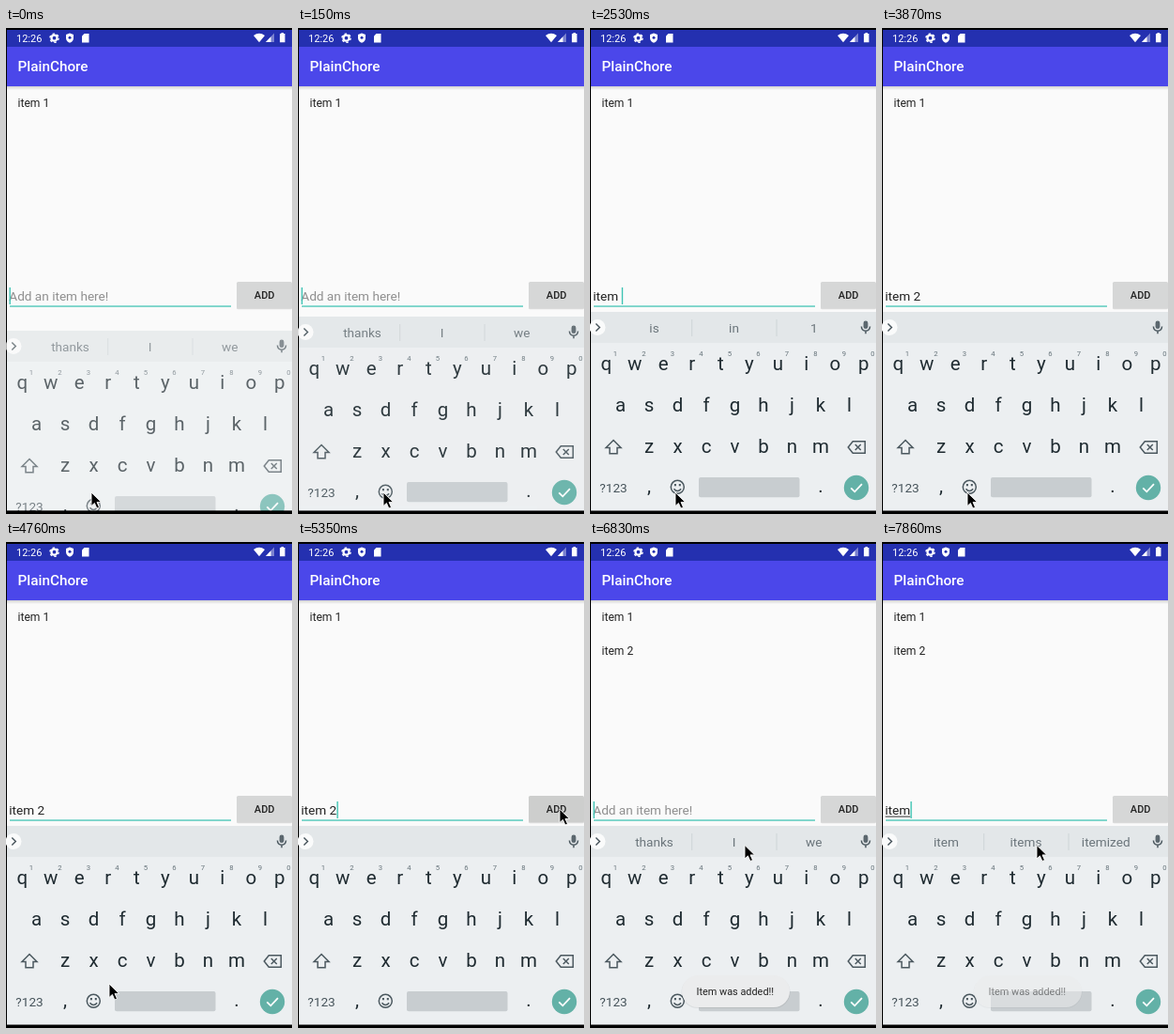
Recreate the animation shown at these times as an HTML page. Size 305 px wide and 517 px high, loop 8000 ms.

```html
<!DOCTYPE html>
<html lang="en">
<head>
<meta charset="utf-8">
<title>To-do list</title>
<style>
html, body { margin: 0; width: 100%; height: 100%; overflow: hidden; background: #000; }
svg { display: block; width: 305px; height: 517px; font-family: Roboto, sans-serif; }
text { white-space: pre; }
.mid { text-anchor: middle; }
.line { fill: none; stroke: #4b585f; stroke-width: 1.5; }
</style>
</head>
<body>
<svg viewBox="0 0 305 517">
  <defs>
    <linearGradient id="shade" x2="0" y2="1">
      <stop offset="0" stop-color="#000" stop-opacity=".16"/>
      <stop offset="1" stop-color="#000" stop-opacity="0"/>
    </linearGradient>
  </defs>
  <rect width="305" height="517"/>
  <rect x="1" y="20" width="304" height="493" fill="#fafafa"/>

  <!-- status bar -->
  <rect x="1" y="2" width="304" height="18" fill="#2430b0"/>
  <g fill="#fff">
    <text x="11" y="14.7" font-size="11">12:26</text>
    <circle cx="51.5" cy="10.7" r="3" fill="none" stroke="#fff" stroke-width="2.2"/>
    <circle cx="51.5" cy="10.7" r="4.6" fill="none" stroke="#fff" stroke-width="1.4" stroke-dasharray="2.4 2.4"/>
    <path d="M68 5.5l4 1.6v3.3q0 3.8-4 5.4q-4-1.6-4-5.4v-3.3z"/>
    <circle cx="68" cy="10.3" r="1.5" fill="#2430b0"/>
    <path d="M83.5 6h5v9.5h-7.5v-7z"/>
    <path d="M264 8q6-4.7 12 0l-6 7.2z"/>
    <path d="M286 5.5v9.5h-9z" opacity=".4"/>
    <path d="M282.5 9.2v5.8h-5.5z"/>
    <path d="M293.5 5h2.5v1h1.5v9.3h-5.5v-9.3h1.5z"/>
  </g>

  <!-- app bar and list -->
  <rect x="1" y="20" width="304" height="42" fill="#4b47ea"/>
  <rect x="1" y="62" width="304" height="4" fill="url(#shade)"/>
  <text x="12.5" y="46.3" font-size="15.3" font-weight="500" fill="#fff">PlainChore</text>
  <g font-size="12.1" fill="#222">
    <text x="12.5" y="84">item 1</text>
    <text id="added" x="12.5" y="120">item 2</text>
  </g>

  <!-- input row -->
  <rect x="4" y="295.2" width="236" height="1.7" fill="#6fd2c6"/>
  <text id="hint" x="3.3" y="290" font-size="13.6" fill="#8f8f8f">Add an item here!</text>
  <text id="typed" x="3.3" y="290" font-size="13.6" fill="#222"></text>
  <rect id="composing" x="3.5" y="291.6" height="1" fill="#333"/>
  <rect id="caret" y="276" width="1.4" height="18" fill="#3fc4b4"/>
  <rect x="246" y="271" width="59" height="28.3" rx="1.5" fill="#000" opacity=".13"/>
  <rect id="button" x="246" y="270" width="59" height="28" rx="1.5"/>
  <text class="mid" x="275.7" y="288.2" font-size="11" font-weight="500" fill="#222">ADD</text>

  <g id="keyboard">
    <rect x="1" y="302" width="304" height="215" fill="#eceff1"/>
    <rect x="1" y="302" width="304" height="33" fill="#e3e7e9"/>
    <circle cx="8" cy="318.5" r="8.5" fill="#fafbfb"/>
    <path class="line" d="M6.3 314.5l4 4l-4 4"/>
    <g id="words" class="mid" font-size="13.6" fill="#6b757b">
      <path d="M108.7 310v18M199 310v18" stroke="#ced4d7"/>
      <text x="68.5" y="324"></text>
      <text x="153.5" y="324"></text>
      <text x="238.7" y="324"></text>
    </g>
    <rect x="291.6" y="311.5" width="4.8" height="8.6" rx="2.4" fill="#5b676e"/>
    <path class="line" stroke-width="1.2" d="M289.4 317.5q.4 4.7 4.6 4.7t4.6-4.7M294 322v3.2"/>
    <g id="keys" class="mid" fill="#1f2b31"></g>
    <path class="line" d="M25 438.5l8 8h-4v6.3h-8v-6.3h-4z"/>
    <path class="line" d="M275.3 446l5-6.3h13v12.6h-13zM282.8 443l6 6m0-6l-6 6"/>
    <text class="mid" x="25" y="493.5" font-size="13.6" fill="#46535a">?123</text>
    <circle class="line" cx="93.3" cy="488.3" r="7"/>
    <path class="line" d="M89.5 490.3q3.8 4.6 7.6 0"/>
    <path d="M89.9 485h2v2.2h-2zM94.8 485h2v2.2h-2z" fill="#4b585f"/>
    <rect x="116" y="478" width="107.5" height="21.3" rx="2" fill="#c8cdd0"/>
    <circle cx="284" cy="489" r="13.2" fill="#63b1a7"/>
    <path d="M278.3 489.3l4 4l7.7-8.2" fill="none" stroke="#fff" stroke-width="1.8"/>
  </g>

  <g id="toast">
    <rect x="97.5" y="462" width="116" height="34" rx="17" fill="#000" opacity=".07"/>
    <rect x="98" y="461" width="115" height="34" rx="17" fill="#ebeced"/>
    <text class="mid" x="154.8" y="481.7" font-size="10.9" fill="#222">Item was added!!</text>
  </g>
  <rect y="513.5" width="305" height="3.5"/>
  <path id="mouse" d="M0 0v14.5l3.4-3.1l2.5 5.6l2.6-1.1l-2.5-5.5h4.6z" stroke="#fff" stroke-width=".9"/>
</svg>

<script>
const LOOP = 8000;
const $ = id => document.getElementById(id);
const svgNode = (tag, attrs, text) => {
  const node = document.createElementNS('http://www.w3.org/2000/svg', tag);
  for (const name in attrs) node.setAttribute(name, attrs[name]);
  node.textContent = text;
  return node;
};

const KEY_STEP = 30.5;
const addRow = (letters, x, y) => [...letters].forEach((letter, i) =>
  $('keys').append(svgNode('text', { x: x + i * KEY_STEP, y, 'font-size': 20.5 }, letter)));
addRow('qwertyuiop', 17.3, 363.5);
addRow('asdfghjkl', 32.5, 407.5);
addRow('zxcvbnm', 63, 451.5);
addRow(',', 63, 494);
addRow('.', 246, 494);
[...'1234567890'].forEach((digit, i) => $('keys').append(
  svgNode('text', { x: 27 + i * KEY_STEP, y: 348.7, 'font-size': 7.7, fill: '#66737a' }, digit)));

// Each track lists [start time, value]; a value holds until the next start.
const typed = [[0, ''], [1340, 'i'], [1490, 'ite'], [1780, 'item'], [2530, 'item '], [3270, 'item 2'],
  [5790, ''], [7420, 'i'], [7570, 'it'], [7710, 'ite'], [7860, 'item']];
const caretOn = [[0, 1], [740, 0], [1340, 1], [2230, 0], [2530, 1], [2980, 0], [3270, 1], [3870, 0],
  [4320, 1], [4760, 0], [5200, 1], [7120, 0], [7420, 1]];
const suggestions = [[0, 'thanks I we'], [1340, "i I I'm"], [1490, 'ite item it'], [1780, 'item items itemized'],
  [2530, 'is in 1'], [3270, ''], [6240, 'thanks I we'], [7420, "i I I'm"], [7570, 'it It its'],
  [7710, 'ite item it'], [7860, 'item items itemized']];
const slide = [[0, [20, .72]], [150, [5, .92]], [300, [0, 1]]];
const mouse = [[0, [91, 494]], [4760, [110, 470]], [4910, [180, 380]], [5060, [262, 297]], [5200, [279, 284]],
  [6240, [262, 292]], [6390, [222, 308]], [6530, [183, 324]], [6680, [170, 328]], [6830, [165, 322.5]]];
const toast = [[0, 0], [6090, .5], [6240, 1], [7860, .5]];
const buttonColor = [[0, '#d6d7d7'], [5200, '#cdcecd'], [6090, '#d6d7d7']];
const listed = [[0, 0], [6090, 1]];

const at = (track, t) => track.findLast(([start]) => start <= t)[1];
const set = (id, name, value) => $(id).setAttribute(name, value);
const wordNodes = $('words').querySelectorAll('text');

function draw(t) {
  const text = at(typed, t);
  $('typed').textContent = text;
  const width = text ? $('typed').getComputedTextLength() : 0;
  set('hint', 'opacity', text ? 0 : 1);
  set('composing', 'width', text.includes(' ') ? 0 : width);
  set('caret', 'x', 3.5 + width);
  set('caret', 'opacity', at(caretOn, t));

  const words = at(suggestions, t);
  set('words', 'opacity', words ? 1 : 0);
  wordNodes.forEach((node, i) => node.textContent = words.split(' ')[i] || '');

  const [drop, alpha] = at(slide, t);
  set('keyboard', 'transform', `translate(0 ${drop})`);
  set('keyboard', 'opacity', alpha);
  set('mouse', 'transform', `translate(${at(mouse, t)})`);
  set('toast', 'opacity', at(toast, t));
  set('button', 'fill', at(buttonColor, t));
  set('added', 'opacity', at(listed, t));
}

const start = performance.now();
function frame() {
  draw((performance.now() - start) % LOOP);
  requestAnimationFrame(frame);
}
frame();
</script>
</body>
</html>
```
